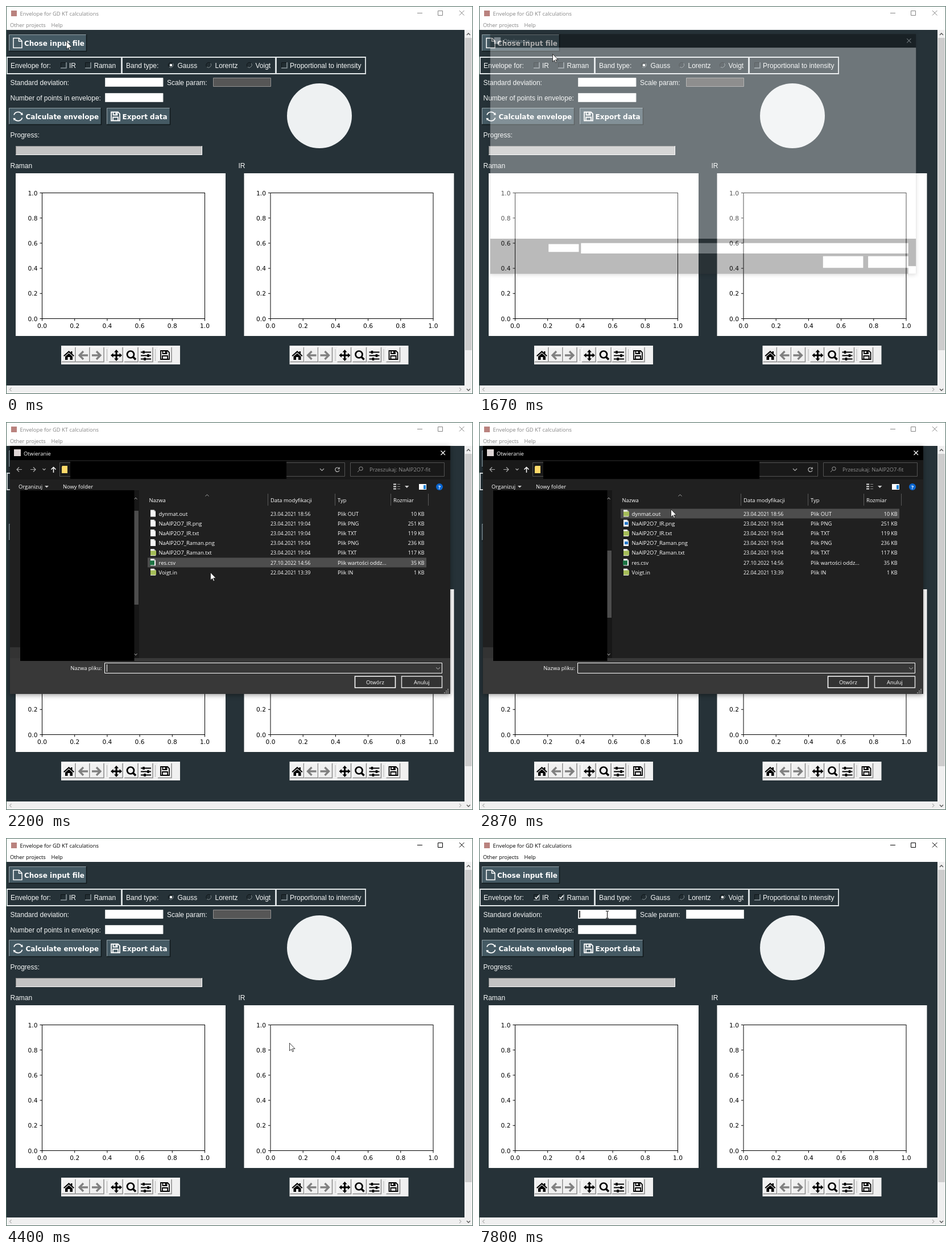
Write an HTML page that moves like this. It is 821 px wide and 682 px high and loops after 8000 ms.

```html
<!DOCTYPE html>
<html lang="en">
<head>
<meta charset="utf-8">
<title>Envelope</title>
<style>
  html, body { margin: 0; width: 100%; height: 100%; overflow: hidden; background: #263238; }
  svg { display: block; width: 100vw; height: 100vh; }
  text { white-space: pre; }
  .ui { font: 9.4px "Open Sans", "Noto Sans", sans-serif; }
  .label { font: 12px "Liberation Sans", Arial, sans-serif; fill: #f4f6f6; }
  .bold { font: bold 12px "DejaVu Sans", Verdana, sans-serif; fill: #fff; }
  .tick { font: 10.67px "DejaVu Sans", sans-serif; fill: #000; }
  .mid { text-anchor: middle; }
  .end { text-anchor: end; }
  .date { font-size: 8.9px; }
  .line { fill: none; }
  #dialog { fill: #fff; transform-origin: 394px 260px; filter: drop-shadow(0 2px 4px rgba(0,0,0,.4)); }
</style>
</head>
<body>
<svg viewBox="0 0 821 682" preserveAspectRatio="none">
  <defs>
    <g id="floppy" fill="none" stroke="currentColor" stroke-width="1.8">
      <path d="M1 1H13L16 4V16H1Z"/>
      <path d="M4.5 1V6H11.5V1M4 16V10H13V16"/>
      <path d="M9.5 2V5" stroke-width="2"/>
    </g>
    <g id="toolbar">
      <path d="M97 597H306V630H97Z" fill="#f0f0f0"/>
      <g id="keys"></g>
      <path d="M177.500 603V624M262.500 603V624" stroke="#b5b5b5"/>
      <path d="M101 614.500L110.500 606 114 609V607H116.500V611.500L120 614.500 118.500 616 110.500 609 102.500 616ZM104 616L110.500 610.500 117 616V622H112.500V617H108.500V622H104Z"/>
      <g class="line" stroke="#808080" stroke-width="3.300">
        <path d="M144 614H130M136 607L129 614 136 621"/>
        <path d="M151 614H165M159 607L166 614 159 621"/>
      </g>
      <path d="M194 604L198 608.500H195.500V612.500H199.500V610L204 614 199.500 618V615.500H195.500V619.500H198L194 624 190 619.500H192.500V615.500H188.500V618L184 614 188.500 610V612.500H192.500V608.500H190Z"/>
      <g class="line" stroke="#000">
        <circle cx="219" cy="612.500" r="6" stroke-width="2.700"/>
        <path d="M223.500 617L228 621.500" stroke-width="3.500"/>
        <path d="M237 608.500H255M237 614.500H255M237 620.500H255" stroke-width="2"/>
        <path d="M242 606V611M250 612V617M244 618V623" stroke-width="3.500"/>
      </g>
      <use href="#floppy" x="271" y="605"/>
    </g>
    <g id="page">
      <path d="M0 0H6.500L9 2.500V12H0Z" fill="#f7f7f7"/>
      <path d="M6.500 0V2.500H9" fill="none" stroke="#999" stroke-width=".7"/>
    </g>
  </defs>

  <path d="M0 0H821V682H0Z" fill="#fff"/>
  <path d="M9 8H19V18H9Z" fill="#b9827e"/>
  <g id="chrome" class="ui" fill="currentColor">
    <text x="24.500" y="16.500">Envelope for GD KT calculations</text>
    <text x="7" y="37">Other projects</text>
    <text x="79.500" y="37">Help</text>
    <path class="line" d="M723 12.500H732M759.500 8.500H767.500V16.500H759.500ZM797 8L805.500 16.500M805.500 8L797 16.500" stroke="currentColor"/>
  </g>
  <path d="M1 42H806V667H1Z" fill="#263238"/>
  <path d="M806 42H820V667H806ZM1 667H820V681H1Z" fill="#f0f0f0"/>
  <path d="M807 56H819V605H807Z" fill="#cdcdcd"/>
  <g class="line" stroke-width="1.300">
    <path d="M810 51L813 48 816 51M810 673L813 676 816 673" stroke="#505050"/>
    <path d="M9.500 671L6.500 674 9.500 677M797 671L800 674 797 677" stroke="#b5b5b5"/>
  </g>
  <path class="line" d="M.5 .5H820.500V681.500H.5Z" stroke="#48675c"/>

  <g id="form"></g>
  <g class="line" stroke="#fff" stroke-width="1.500">
    <path d="M13 56.500H23L28 61.500V73.500H13ZM22.500 57V62H28"/>
    <path d="M14 191.500A7.500 7.500 0 0 1 28 191M28.500 196.500A7.500 7.500 0 0 1 14.500 197.500" stroke-width="1.800"/>
    <path d="M25.500 191.500H30L28.500 187ZM17 197H12.500L14 201.500Z" fill="#fff" stroke="none"/>
  </g>
  <use href="#floppy" x="184" y="185.500" color="#fff"/>
  <path class="line" d="M2 90H203V119H2ZM204 90H474V119H204ZM475 90H632V119H475Z" stroke="#e2e7e9" stroke-width="1.800"/>
  <path d="M174.500 126.500H276V141.500H174.500ZM174.500 153.500H276V168.500H174.500Z" fill="#fff" stroke="#d5d8d9"/>
  <path id="scale" d="M364.500 126.500H465.500V141.500H364.500Z"/>
  <path d="M17 246H345V262H17Z" fill="#c3c3c3"/>
  <path class="line" d="M17.500 261V246.500H345" stroke="#8b8b8b"/>
  <path class="line" d="M17 261.500H344.500V246" stroke="#fff"/>
  <circle cx="551" cy="193" r="57" fill="#eef1f2"/>
  <g class="line" stroke="#fff" stroke-width="1.700">
    <path id="checkIR" d="M98.500 104L100.700 106.500 105 101"/>
    <path id="checkRaman" d="M141.500 104L143.700 106.500 148 101"/>
  </g>
  <circle id="dot" cy="104" r="2.300" fill="#fff"/>
  <path id="caret" d="M177 128V140" stroke="#000" stroke-width="1.500"/>
  <g id="plots"></g>
  <use href="#toolbar"/>
  <use href="#toolbar" x="401.500"/>

  <g id="dialog" class="ui">
    <path d="M7 42H781V478H7Z" fill="#323232"/>
    <path id="titlebar" d="M7 42H781V67H7Z"/>
    <g id="titleMarks">
      <path d="M14 48H26V60H14Z" fill="#ded5d4"/>
      <path class="line" d="M764.500 50.500L772 58M772 50.500L764.500 58" stroke="#fff" stroke-width="1.200"/>
    </g>
    <text id="dialogTitle" y="58.500">Otwieranie</text>
    <g id="skeleton">
      <path d="M7 67H781V414H7ZM113 424H168V438H113ZM172 422H767V441H172ZM612 446H685V467H612ZM694 446H767V467H694ZM767 464H781V478H767Z"/>
    </g>
    <g id="content">
      <path d="M7 67H781V415H7Z" fill="#202020"/>
      <path d="M7 67H781V101H7Z" fill="#191919"/>
      <path d="M7 396H25V415H7Z" fill="#333"/>
      <path d="M7 415H781V478H7Z" fill="#383838"/>
      <path d="M225 120H234V415H225Z" fill="#171717"/>
      <path id="thumb" fill="#4d4d4d"/>
      <g class="line">
        <path d="M94.500 71.500H595.500V95.500H94.500ZM605.500 71.500H770.500V95.500H605.500Z" stroke="#535353"/>
        <path d="M28 83.500H19M23 79.500L19 83.500 23 87.500M43 83.500H52M48 79.500L52 83.500 48 87.500" stroke="#aaa" stroke-width="1.200"/>
        <path d="M64.500 82L67 84.500 69.500 82M552 82L555.500 85.500 559 82" stroke="#aaa" stroke-width="1.200"/>
        <path d="M83.500 89V79M79.500 83.500L83.500 79.500 87.500 83.500" stroke="#fff" stroke-width="1.500"/>
        <path d="M585.500 81.500A3.700 3.700 0 1 0 586 85M586 79.500V82.500H583" stroke="#bbb" stroke-width="1.200"/>
        <circle cx="624" cy="82" r="3.200" stroke="#999"/>
        <path d="M621.500 84.500L618 88" stroke="#999"/>
        <path d="M225.500 136L228 133 230.500 136M225.500 407L228 410 230.500 407M350.500 130.500L353.500 127.500 356.500 130.500" stroke="#aaa"/>
        <path d="M460.500 126V147M578.500 126V147M676.500 126V147M742.500 126V147" stroke="#585858"/>
        <path d="M681 109.500H686M681 113.500H686M681 117.500H686" stroke="#ddd" stroke-width="2"/>
        <path d="M688 109.500H693M688 113.500H693M688 117.500H693" stroke="#888"/>
      </g>
      <path d="M99 77H108V90H98V79Z" fill="#ffd969"/>
      <path d="M113 69H493V100H113ZM25 120H225.500V420H25Z" fill="#000"/>
      <path d="M68 112H75L71.500 115.500ZM701 112H708.500L704.700 116Z" fill="#ccc"/>
      <path d="M726 109H739V119H726Z"/>
      <path d="M734 111H738V118H734Z" fill="#1683d8"/>
      <circle cx="762" cy="114" r="6" fill="#0a66d0"/>
      <text x="762" y="117.500" class="mid" font-weight="bold">?</text>
      <path id="hover" d="M249 0H739V17H249Z"/>
      <g id="files"></g>
      <path id="field" d="M173.500 423.500H766.500V441.500H173.500Z" fill="#383838"/>
      <path class="line" d="M756 431.500L759.500 434.500 763 431.500" stroke="#bbb"/>
      <path id="selection" d="M176 426H228V439H176Z" fill="#0078d7"/>
      <text id="fileName" x="177" y="436.500">dynmat.out</text>
      <path id="fieldCaret" d="M177.500 426V439" stroke="#fff"/>
      <path id="open" d="M613.500 447H684.500V467H613.500Z" stroke="#fff" stroke-width="1.600"/>
      <path d="M695.500 447H766.500V467H695.500Z" fill="#333" stroke="#e0e0e0" stroke-width="1.500"/>
      <path d="M776 470H778M776 473H778M773 473H775M776 476H778M773 476H775M770 476H772" stroke="#aaa" stroke-width="1.500"/>
      <g id="captions"></g>
    </g>
  </g>

  <g id="pointer">
    <path id="arrow" d="M0 0V13.500L3.200 10.600 5.200 15.200 7.200 14.300 5.200 9.900H9.500Z" fill="#fff" stroke="#111" stroke-width=".8"/>
    <path id="beam" d="M-2.500 -6H-.5L0 -5.500 .5 -6H2.500M0 -5.500V6M-2.500 6.500H2.500" fill="none" stroke="#000"/>
  </g>
</svg>
<script>
const $ = id => document.getElementById(id);
const add = (id, markup) => { $(id).innerHTML += markup; };
const text = (x, y, words, cls = '') => `<text x="${x}" y="${y}" class="${cls}">${words}</text>`;
const rect = (x, y, w, h, attrs) => `<rect x="${x}" y="${y}" width="${w}" height="${h}" ${attrs}/>`;
const bevel = (x, y, w, h, fill, light, dark) => rect(x, y, w, h, `fill="${fill}"`) +
  `<path class="line" d="M${x + .5} ${y + h}V${y + .5}H${x + w}" stroke="${light}"/>` +
  `<path class="line" d="M${x} ${y + h - .5}H${x + w - .5}V${y}" stroke="${dark}" stroke-width="1.500"/>`;

// Main window form
for (const [x, y, w, textX, words] of [
  [5, 50, 137, 32, 'Chose input file'],
  [5, 179, 163, 34.5, 'Calculate envelope'],
  [177, 179, 112, 204.5, 'Export data']
]) add('form', bevel(x, y, w, 30, '#455a64', '#94a1a7', '#10181b') + text(textX, y + 19.5, words, 'bold'));
for (const [x, y, words] of [
  [8, 109, 'Envelope for:'], [111, 109, 'IR'], [154.5, 109, 'Raman'],
  [211, 109, 'Band type:'], [301.5, 109, 'Gauss'], [367.5, 109, 'Lorentz'], [438.5, 109, 'Voigt'],
  [499, 109, 'Proportional to intensity'], [7.5, 138.5, 'Standard deviation:'],
  [283, 138.5, 'Scale param:'], [7.5, 165.5, 'Number of points in envelope:'],
  [7.5, 231, 'Progress:'], [7.5, 285, 'Raman'], [408.5, 285, 'IR']
]) add('form', text(x, y, words, 'label'));
for (const x of [96, 139, 484]) add('form', bevel(x, 99, 10.5, 10.5, '#222d32', '#0f1619', '#8d999e'));
for (const x of [290, 356.5, 428])
  add('form', `<circle cx="${x}" cy="104" r="4.700" fill="#222d32" stroke="#0f1619"/>
    <path class="line" d="M${x + 3.3} 100.700A4.700 4.700 0 0 1 ${x - 3.3} 107.300" stroke="#8d999e"/>`);

// Empty plots
for (const dx of [0, 401.5]) {
  let plot = rect(17 + dx, 294, 369, 286, 'fill="#fff"') +
    rect(63.5 + dx, 328.5, 286, 221, 'fill="none" stroke="#000"');
  for (let i = 0; i < 6; i++) {
    const x = 63.5 + dx + i * 57.2, y = 549.5 - i * 44.2, value = (i / 5).toFixed(1);
    plot += `<path d="M${x} 549V553.500M${63 + dx} ${y}H${59.5 + dx}" stroke="#000"/>` +
      text(x, 566, value, 'tick mid') + text(55.5 + dx, y + 4, value, 'tick end');
  }
  add('plots', plot);
}
for (const x of [98, 123, 148, 181, 208, 234, 267])
  add('keys', bevel(x, 600, 24.5, 26, '#f0f0f0', '#fff', '#8c8c8c'));

// File list
const rowTop = i => 152.5 + 17.2 * i;
const icon = {
  image: rect(2, 4, 6, 5, 'fill="#2175c8"'),
  note: rect(0, 3, 10, 8, 'fill="#a5bd58"'),
  sheet: rect(-1, 3, 8, 8, 'fill="#1d7444"')
};
[
  ['dynmat.out', '23.04.2021 18:56', 'Plik OUT', 10, 'note'],
  ['NaAlP2O7_IR.png', '23.04.2021 19:04', 'Plik PNG', 251, 'image'],
  ['NaAlP2O7_IR.txt', '23.04.2021 19:04', 'Plik TXT', 119, 'note'],
  ['NaAlP2O7_Raman.png', '23.04.2021 19:04', 'Plik PNG', 236, 'image'],
  ['NaAlP2O7_Raman.txt', '23.04.2021 19:04', 'Plik TXT', 117, 'note'],
  ['res.csv', '27.10.2022 14:56', 'Plik wartości oddz...', 35, 'sheet'],
  ['Voigt.in', '22.04.2021 13:39', 'Plik IN', 1, 'note']
].forEach(([name, date, type, size, kind], i) => {
  const y = rowTop(i) + 12;
  add('files', `<g transform="translate(254 ${y - 10})"><use href="#page"/>
    <g class="${i < 4 ? 'late' : ''}">${icon[kind]}</g></g>` + text(268.5, y, name) +
    text(465, y, date, 'date') + text(583, y, type) + text(735.5, y, size + ' KB', 'end date'));
});
for (const [x, y, words, cls] of [
  [22, 117, 'Organizuj'], [100, 117, 'Nowy folder'], [251.5, 141, 'Nazwa'],
  [465, 141, 'Data modyfikacji'], [583, 141, 'Typ'], [681, 141, 'Rozmiar'],
  [168.5, 436, 'Nazwa pliku:', 'end'], [649, 460.5, 'Otwórz', 'mid'], [731, 460.5, 'Anuluj', 'mid']
]) add('captions', text(x, y, words, cls));
add('captions', '<g fill="#929292">' + text(639, 87, 'Przeszukaj: NaAlP2O7-fit') + '</g>');

// Motion runs at 15 steps per second; pointer stops are [step, x, y]
const STEP = 1000 / 15, LOOP = 8000;
const stops = [
  [0, 106, 62], [4, 106, 62], [5, 104, 61], [9, 104, 61], [15, 106, 63], [21, 122, 76],
  [22, 122, 76], [23, 129, 84], [25, 129, 84], [33, 359, 264], [35, 359, 264], [38, 352, 235],
  [40, 340, 147], [42, 337, 153], [48, 337, 153], [59, 645, 452], [61, 648, 456], [63, 648, 456],
  [74, 99, 104], [77, 101, 103], [81, 144, 103], [84, 162, 104], [86, 182, 114], [87, 172, 110],
  [92, 420, 90], [96, 562, 186], [100, 480, 150], [104, 428, 104], [106, 428, 104],
  [110, 320, 161], [113, 225, 134], [120, 225, 134]
];
function pointerAt(step) {
  const next = Math.max(1, stops.findIndex(s => s[0] >= step));
  const [s0, x0, y0] = stops[next - 1], [s1, x1, y1] = stops[next];
  const u = (step - s0) / (s1 - s0);
  return [x0 + (x1 - x0) * u, y0 + (y1 - y0) * u];
}
const show = (id, on) => { $(id).style.display = on ? '' : 'none'; };
const paint = (id, name, value) => $(id).setAttribute(name, value);
const fades = { 25: [.33, .967], 26: [.8, .99], 64: [.6, .985], 65: [.2, .96] };

function drawDialog(step) {
  const open = step >= 25 && step < 66;
  show('dialog', open);
  if (!open) return;
  const [opacity, zoom] = fades[step] || [1, 1];
  const closing = step >= 63;
  $('dialog').style.opacity = opacity;
  $('dialog').style.transform = `scale(${zoom})`;
  show('skeleton', step === 25);
  show('content', step > 25);
  show('titleMarks', !closing);
  paint('titlebar', 'fill', closing ? '#0a0a0a' : '#000');
  paint('dialogTitle', 'x', closing ? 14 : 31);
  paint('thumb', 'd', step < 36 ? 'M225 156H233V321H225Z' : 'M225 226H233V344H225Z');
  for (const el of document.querySelectorAll('.late')) el.style.display = step < 36 ? 'none' : '';

  const [x, y] = pointerAt(step - 1);
  const picked = step >= 47;
  const row = picked ? 0 : Math.floor((y - rowTop(0)) / 17.2);
  show('hover', picked || (x > 249 && y > 147 && row < 7));
  paint('hover', 'transform', `translate(0 ${rowTop(Math.max(0, row))})`);
  paint('hover', 'fill', !picked ? '#4d4d4d' : step < 50 ? '#666' : '#333');

  const focused = step < 49;
  paint('field', 'stroke', focused ? '#fff' : '#8c8c8c');
  show('fileName', picked);
  show('selection', !focused);
  show('fieldCaret', step >= 30 && step < 38);
  paint('open', 'fill', step >= 62 ? '#666' : step >= 59 ? '#454545' : '#333');
}

function draw(now) {
  const step = Math.floor((now % LOOP + 4) / STEP) % 120;
  const active = (step >= 9 && step < 21) || step >= 65;
  paint('chrome', 'color', active ? '#000' : '#858585');
  show('checkIR', step >= 77);
  show('checkRaman', step >= 81);
  const voigt = step >= 105;
  paint('dot', 'cx', voigt ? 428 : 290);
  paint('scale', 'fill', voigt ? '#fff' : '#565656');
  paint('scale', 'stroke', voigt ? '#d5d8d9' : '#929292');
  show('caret', step >= 115);
  drawDialog(step);

  const [x, y] = pointerAt(step);
  const inField = step > 66 && y > 126 && y < 142 && ((x > 174 && x < 277) || (x > 364 && x < 466));
  show('arrow', !inField);
  show('beam', inField);
  paint('pointer', 'transform', `translate(${Math.round(x) + .5} ${Math.round(y) + .5})`);
}

const start = performance.now();
(function tick() {
  draw(performance.now() - start);
  requestAnimationFrame(tick);
})();
</script>
</body>
</html>
```
